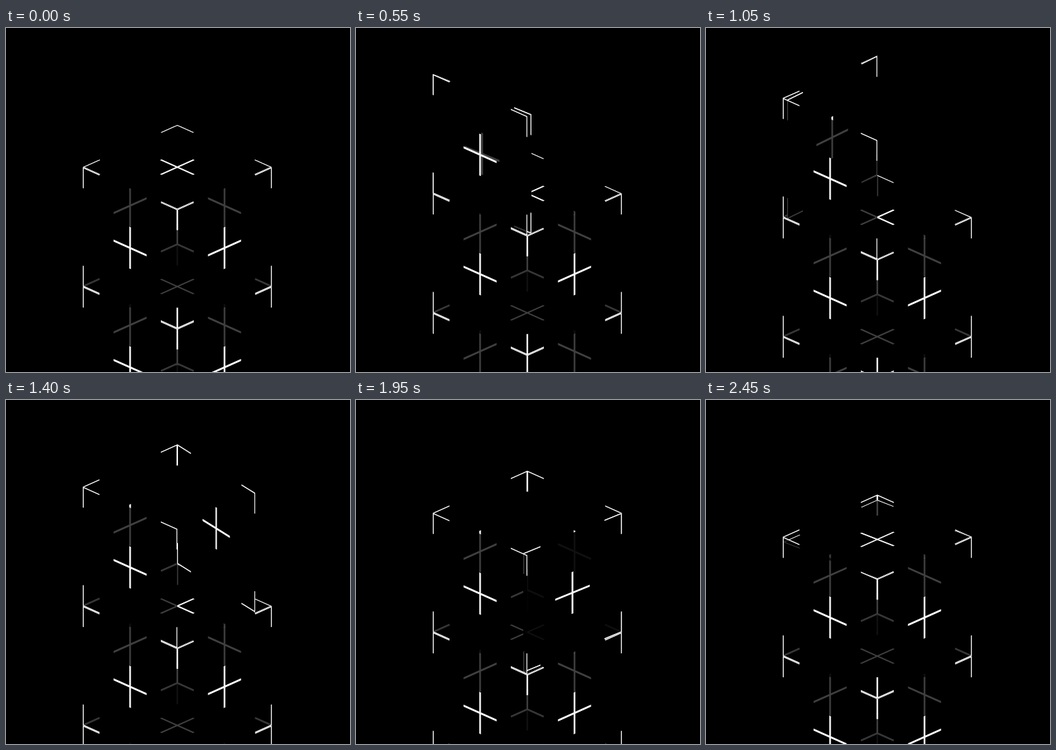
An HTML page with a canvas that plays this animation: 500 by 500 pixels, repeating every 2.5 s.

```html
<!DOCTYPE html>
<html lang="en">
<head>
<meta charset="utf-8">
<title>Folding tower</title>
<style>
  html, body { margin: 0; width: 100%; height: 100%; overflow: hidden; background: #000; }
  canvas { display: block; width: 500px; height: 500px; }
</style>
</head>
<body>
<canvas id="stage" width="500" height="500"></canvas>
<script>
const ctx = document.getElementById('stage').getContext('2d');

const LOOP = 2500, PHASE = 500, STEP = 50;
const LEFT = 111.8, TOP = 202.25;
const P = 137.2, Q = 61.35, H = 173.5;

// Projected cube edges: left to front, left to back, and up.
const U = [P, Q], V = [P, -Q], W = [0, -H];
const ZERO = [0, 0];
const add = (a, b) => [a[0] + b[0], a[1] + b[1]];
const neg = a => [-a[0], -a[1]];
const ease = p => p * p * (3 - 2 * p);

// Each face turns a quarter around its hinge.
const FACES = [
  { at: ZERO,      hinge: U, from: V,      to: W },       // front left
  { at: ZERO,      hinge: W, from: U,      to: V },       // back left
  { at: V,         hinge: W, from: neg(V), to: U },       // back right
  { at: add(U, V), hinge: W, from: neg(U), to: neg(V) },  // front right
  { at: add(U, W), hinge: V, from: neg(W), to: neg(U) }   // lid
];
const PAINT_ORDER = [1, 2, 3, 0, 4];

const marks = makeMarks(0.175, 0.0086);

// A plus in the middle and a quarter of one in every corner of a unit square.
function makeMarks(arm, half) {
  const path = new Path2D();
  const clamp = n => Math.min(1, Math.max(0, n));
  const bar = (x, y, rx, ry) => {
    const x0 = clamp(x - rx), y0 = clamp(y - ry);
    path.rect(x0, y0, clamp(x + rx) - x0, clamp(y + ry) - y0);
  };
  for (const [x, y] of [[0.5, 0.5], [0, 0], [1, 0], [0, 1], [1, 1]]) {
    bar(x, y, arm, half);
    bar(x, y, half, arm);
  }
  return path;
}

function drawFace(index, baseY, turn = 1, layers = 1) {
  const { at, hinge, from, to } = FACES[index];
  const angle = turn * Math.PI / 2;
  const c = Math.cos(angle), s = Math.sin(angle);
  ctx.setTransform(
    hinge[0], hinge[1],
    c * from[0] + s * to[0], c * from[1] + s * to[1],
    LEFT + at[0], baseY + at[1]
  );
  for (let i = 0; i < layers; i++) {
    ctx.fillStyle = 'rgba(0,0,0,0.75)';
    ctx.fillRect(0, 0, 1, 1);
    ctx.fillStyle = '#fff';
    ctx.fill(marks);
  }
}

function draw(t) {
  const phase = Math.floor(t / PHASE);
  const turn = ease((t % PHASE) / PHASE);
  const topY = TOP + H * t / LOOP;

  ctx.setTransform(1, 0, 0, 1, 0, 0);
  ctx.fillStyle = '#000';
  ctx.fillRect(0, 0, 500, 500);

  for (let level = 3; level >= 1; level--) {
    for (const f of PAINT_ORDER) drawFace(f, topY + level * H);
  }

  // The faces still to come travel together as one stack.
  const moving = () => drawFace(phase, topY, turn, FACES.length - phase);
  if (phase > 1) drawFace(1, topY);
  if (phase > 2) drawFace(2, topY);
  moving();
  if (phase > 0) drawFace(0, topY);
  if (phase > 3) drawFace(3, topY);
}

const start = performance.now();
function tick() {
  const t = performance.now() - start;
  // Runs at 20 steps a second, with a little slack for late timers.
  draw(Math.floor((t + 12) / STEP) * STEP % LOOP);
  requestAnimationFrame(tick);
}
tick();
</script>
</body>
</html>
```
